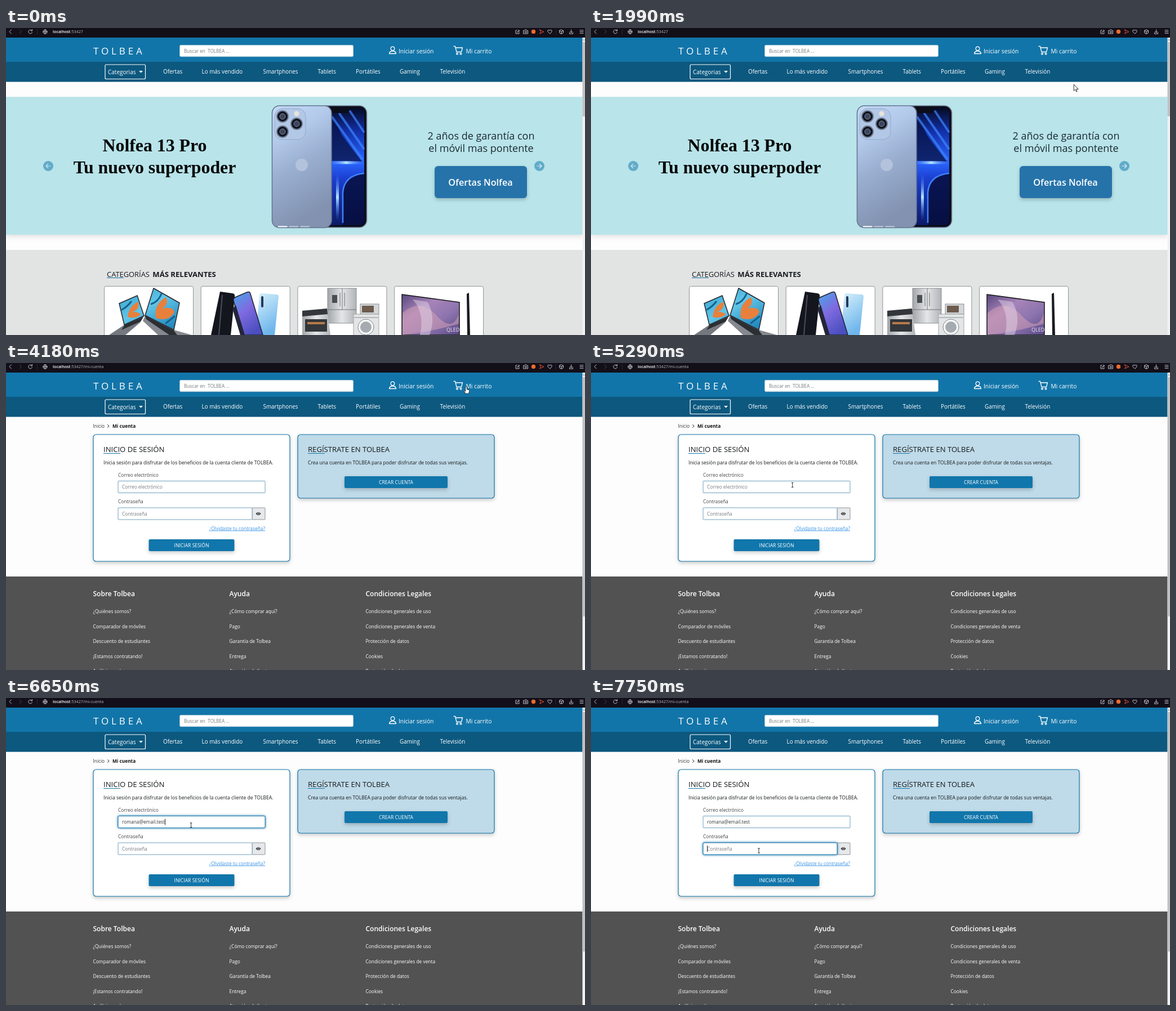
These frames come from a looping animation (1028x545 px, 8 s). An HTML page:

```html
<!DOCTYPE html>
<html lang="es">
<head>
<meta charset="utf-8">
<title>Tienda</title>
<style>
  html, body { margin: 0; width: 100%; height: 100%; overflow: hidden; background: #fdfdfd; }
  svg { display: block; width: 100vw; height: 100vh; }
  text { font-family: "Open Sans", "Noto Sans", sans-serif; white-space: pre; }
  .serif { font-family: "Liberation Serif", "Noto Serif", serif; font-weight: 700; }
  .medium { font-weight: 500; }
  .semi { font-weight: 600; }
  .bold { font-weight: 700; }
  .mid { text-anchor: middle; }
  .end { text-anchor: end; }
  .link { text-decoration: underline; }
  .line { fill: none; stroke-linecap: round; stroke-linejoin: round; }
  .shadow { filter: drop-shadow(0 3px 3px rgba(0, 0, 0, .2)); }
  .soft { filter: drop-shadow(0 4px 4px rgba(0, 0, 0, .1)); }
  .glow { filter: drop-shadow(0 0 2px #1176ab); }
</style>
</head>
<body>
<svg viewBox="0 0 1028 545" preserveAspectRatio="none">
  <defs>
    <linearGradient id="back" x2=".3" y2="1"><stop stop-color="#c3dbf8"/><stop offset=".3" stop-color="#b2c9ea"/><stop offset=".55" stop-color="#9bb0d2"/><stop offset="1" stop-color="#8292b0"/></linearGradient>
    <linearGradient id="screen" x2="0" y2="1"><stop stop-color="#060b26"/><stop offset=".2" stop-color="#1230a8"/><stop offset=".46" stop-color="#2a66ff"/><stop offset=".6" stop-color="#1b3fd0"/><stop offset="1" stop-color="#0c1a66"/></linearGradient>
    <linearGradient id="beam"><stop stop-color="#3c78ff" stop-opacity="0"/><stop offset=".5" stop-color="#b4e6ff"/><stop offset="1" stop-color="#3c78ff" stop-opacity="0"/></linearGradient>
    <linearGradient id="beamV" x2="0" y2="1"><stop stop-color="#3c78ff" stop-opacity="0"/><stop offset=".5" stop-color="#b4e6ff"/><stop offset="1" stop-color="#3c78ff" stop-opacity="0"/></linearGradient>
    <linearGradient id="violet" x2=".6" y2="1"><stop stop-color="#47a9e8"/><stop offset=".5" stop-color="#7f6ae0"/><stop offset="1" stop-color="#4b4fc0"/></linearGradient>
    <linearGradient id="ice" x2=".4" y2="1"><stop stop-color="#d9f2fb"/><stop offset="1" stop-color="#6fb6ec"/></linearGradient>
    <linearGradient id="tv" x2="1" y2="1"><stop stop-color="#59487f"/><stop offset=".35" stop-color="#a684b8"/><stop offset=".65" stop-color="#8d74ae"/><stop offset="1" stop-color="#5a4a86"/></linearGradient>
    <linearGradient id="steel"><stop stop-color="#a2a6a9"/><stop offset=".5" stop-color="#e4e6e7"/><stop offset="1" stop-color="#b0b4b7"/></linearGradient>
    <linearGradient id="wallpaper" x2=".8" y2="1"><stop stop-color="#2f9ccb"/><stop offset=".5" stop-color="#62c6e8"/><stop offset="1" stop-color="#2387bd"/></linearGradient>
  </defs>

  <rect width="1028" height="545" fill="#fdfdfd"/>

  <g id="home">
    <rect class="soft" y="122.300" width="1024" height="244.700" fill="#b8e4ea"/>
    <g id="phone">
      <rect x="556" y="138" width="84.500" height="216" rx="13" fill="#0b0d18" stroke="#77809a" stroke-width="1.600"/>
      <rect x="560" y="142" width="76" height="208" rx="9" fill="url(#screen)"/>
      <path d="M578 150V236L632 237 596 190Z" fill="#071040" opacity=".75"/>
      <path class="line" d="M579 158L632 232M592 152L635 214M611 148L635 184" stroke="#3d86ff" stroke-width="4" opacity=".7"/>
      <path d="M598 350V292Q600 262 636 258V341Q636 350 628 350Z" fill="#060d3c" opacity=".85"/>
      <path class="line" d="M598 345V292Q600 262 635 258" stroke="#3f83ff" stroke-width="2.500"/>
      <rect x="572" y="236.500" width="64" height="5" fill="url(#beam)"/>
      <rect x="586" y="258" width="5" height="84" fill="url(#beamV)"/>
      <path d="M574 141H608V146Q608 151 602 151H574Z" fill="#0b0d18"/>
      <rect x="472.500" y="138" width="105.500" height="216.500" rx="13" fill="url(#back)" stroke="#687690" stroke-width="1.600"/>
      <rect x="477" y="143" width="55" height="55" rx="14" fill="#b3c8e6" stroke="#93a9ca"/>
      <g fill="#0f131c" stroke="#6d7a92" stroke-width="2"><circle cx="491" cy="157" r="10"/><circle cx="516" cy="170" r="10"/><circle cx="491" cy="184" r="10"/></g>
      <g fill="#3a4660" stroke="#7d8798"><circle cx="491" cy="157" r="5"/><circle cx="516" cy="170" r="5"/><circle cx="491" cy="184" r="5"/></g>
      <circle cx="516" cy="152" r="4.500" fill="#e9e3dc"/>
      <circle cx="525" cy="243" r="11" fill="#b4c3dc"/>
    </g>
    <path d="M483 352.500H499.500" stroke="#fff" stroke-width="2"/>
    <path d="M502.500 352.500H519M522.500 352.500H539" stroke="#fff" stroke-width="2" opacity=".5"/>
    <rect class="shadow" x="761" y="245" width="164" height="57" rx="6" fill="#2673aa"/>
    <g class="line" stroke="#fff" stroke-width="1.200">
      <circle cx="75" cy="245" r="9" fill="#1176ab" stroke="none" opacity=".52"/>
      <path d="M79 245H71M74.500 241.500L71 245 74.500 248.500" opacity=".7"/>
      <circle id="next" cx="947" cy="245" r="9" fill="#1176ab" stroke="none"/>
      <path d="M943 245H951M947.500 241.500L951 245 947.500 248.500" opacity=".8"/>
    </g>

    <rect y="394" width="1024" height="151" fill="#e2e4e4"/>
    <path d="M179 443.500H209" stroke="#1176ab"/>
    <g id="cards" fill="#fff" stroke="#8f9394"></g>

    <path d="M210 527L245 511 238 523 212 545H183Z" fill="#75797f"/>
    <path d="M211 527L244 513 239 521 205 536Z" fill="#2b2e33"/>
    <path d="M247 510L298 536 330 545H270L243 520Z" fill="#85898f"/>
    <path d="M247 511L298 537 304 545H290L249 517Z" fill="#2b2e33"/>
    <path d="M201 489L233 475 245 511 210 527ZM262 462L308 488 298 536 247 510Z" fill="url(#wallpaper)" stroke="#24262b" stroke-width="1.500"/>
    <path d="M216 513Q218 493 235 486 238 500 224 504 238 504 239 509 228 517 216 513ZM266 515Q262 490 284 478 290 490 277 498 296 494 299 504 290 522 266 515Z" fill="#e8803c"/>
    <path d="M206 500Q216 494 222 486M258 490Q270 486 276 472M284 524Q294 516 299 512" class="line" stroke="#14628f" stroke-width="3"/>

    <path d="M380 468L402 471Q407 472 406 477L399 545H364Z" fill="#14161d"/>
    <path d="M384 474L378 545" stroke="#4a4f5c" stroke-width="2"/>
    <path d="M450 475Q450 471 454 471L480 473Q484 473 484 477L477 545H443Z" fill="url(#ice)"/>
    <path d="M404 484Q403 480 407 478L428 469Q433 467 434 472L456 545H420Z" fill="url(#violet)" stroke="#20222e" stroke-width="1.500"/>
    <path d="M408 492L424 545H416L402 498Z" fill="#23263a"/>
    <path d="M455 478V494" stroke="#24385a" stroke-width="4" stroke-linecap="round"/>

    <rect x="571" y="462" width="51" height="62" fill="url(#steel)" stroke="#8b8f92"/>
    <path d="M597 462V500M571 500H622M593 470V494M601 470V494" stroke="#6f7376"/>
    <rect x="579" y="474" width="9" height="14" fill="#4a4e52"/>
    <path d="M526 502L570 498 576 545H526Z" fill="url(#steel)"/>
    <path d="M526 502L570 498 571 508 526 512ZM531 517H570V539H531Z" fill="#33363a"/>
    <path d="M535 524H566" stroke="#b77a4a" stroke-width="4"/>
    <rect x="629" y="490" width="33" height="18" fill="#d4d6d8" stroke="#8a8e91"/>
    <rect x="632" y="493" width="21" height="12" fill="#6d5b4e"/>
    <rect x="617" y="508" width="45" height="40" fill="#e3e5e6" stroke="#a2a5a8"/>
    <path d="M618 514H661" stroke="#8a8e91"/>
    <circle cx="639" cy="531" r="12" fill="#a5abb0" stroke="#f8f9f9" stroke-width="4"/>
    <circle cx="639" cy="531" r="14" fill="none" stroke="#80858a"/>

    <path d="M703 473L805 487V545H703Z" fill="url(#tv)" stroke="#17181d" stroke-width="1.500"/>
    <path d="M704 506Q735 478 764 510T804 507V525Q760 538 704 545Z" fill="#d9a3b8" opacity=".5"/>
    <path d="M722 482Q744 505 735 545H752Q764 512 748 486Z" fill="#e6dbea" opacity=".45"/>
    <path d="M818 472L822 470 824 545H819Z" fill="#191b20"/>
  </g>

  <g id="account">
    <g class="shadow" stroke="#1176ab" stroke-width="1.200">
      <rect x="155" y="127" width="349" height="225" rx="5" fill="#fff"/>
      <rect x="518" y="127" width="349" height="113" rx="5" fill="#bfdae8"/>
    </g>
    <path d="M173 160.500H203M536 160.500H566" stroke="#1176ab"/>
    <path class="line" d="M180.500 109.500L183 112 180.500 114.500" stroke="#222"/>
    <g fill="#fff" stroke="#5f97b8" stroke-width=".9">
      <rect x="199" y="209.500" width="261" height="21" rx="1"/>
      <rect x="437" y="257" width="23" height="21" rx="1" fill="#e6e8eb" stroke="#85898e"/>
      <rect x="199" y="257" width="238" height="21" rx="1"/>
    </g>
    <path d="M443.500 267.500Q448 262 452.500 267.500 448 273 443.500 267.500Z" fill="#222"/>
    <circle cx="448" cy="267.500" r="1.700" fill="#222" stroke="#e6e8eb" stroke-width=".9"/>
    <rect id="emailFocus" class="glow" x="199" y="209.500" width="261" height="21" rx="2" fill="#fff" stroke="#1c78ab"/>
    <rect id="passFocus" class="glow" x="199" y="257" width="238" height="21" rx="2" fill="#fff" stroke="#1c78ab"/>
    <g class="shadow" fill="#1176ab">
      <rect x="253.500" y="313" width="152" height="21" rx="2"/>
      <rect x="601" y="201" width="183" height="21" rx="2"/>
    </g>
    <rect y="379" width="1024" height="166" fill="#525252"/>
  </g>

  <g id="chrome">
    <rect width="1028" height="17" fill="#120f19"/>
    <rect y="17" width="1024" height="43" fill="#1275a9"/>
    <rect y="60" width="1024" height="35.600" fill="#0c587f"/>
    <rect x="308.500" y="30.400" width="308" height="20.400" rx="2" fill="#fff" stroke="#c3d3dc" stroke-width=".6"/>
    <rect x="176" y="65" width="71.500" height="25.500" rx="2" fill="none" stroke="#fff" stroke-width="1.200"/>
    <path d="M236 76H243L239.500 79.700Z" fill="#fff"/>
    <rect x="1023.500" y="17" width="4.500" height="528" fill="#f1f1f1"/>
    <rect id="thumb" x="1023.500" y="25" width="4.500" fill="#c1c1c3"/>
    <path d="M1024.500 22L1026 20 1027.500 22Z" fill="#777"/>
    <g class="line" stroke="#fff" stroke-width="1.300">
      <circle cx="686.500" cy="36.500" r="3.300"/>
      <path d="M680.500 45.500Q681 41 686.500 41T692.500 45.500Z"/>
      <path d="M795 32.500H797.500L800 42.500H808.500L810.500 35H798.300"/>
      <circle cx="801" cy="45.700" r="1.400"/><circle cx="807.500" cy="45.700" r="1.400"/>
    </g>
    <g class="line" stroke="#d4d2da" stroke-width=".9">
      <path d="M9.500 3L6 6.500 9.500 10M45.500 4A3.400 3.400 0 1 0 46.500 7.500M46.500 2.500V5H44"/>
      <path d="M24 3L27.500 6.500 24 10" opacity=".3"/>
      <path d="M55.500 2V11" opacity=".15"/>
      <path d="M69.500 3A3.700 3.700 0 1 1 69.400 3ZM66 6.700H73M69.500 3Q66.500 6.700 69.500 10.400 72.500 6.700 69.500 3"/>
      <path d="M907 4H905V10H911V8M907.500 8Q907.500 5 911.500 5M909.500 3L911.500 5 909.500 7"/>
      <path d="M919 4.500H920.500L921.500 3H924L925 4.500H926.500V10H919Z"/><circle cx="922.700" cy="7" r="1.500"/>
      <path d="M947.500 3L955 6.700 947.500 10 949.500 6.700Z" stroke="#f0563c"/>
      <path d="M965.500 10L962 6.500Q961 3.500 963.500 3.300 965 3.300 965.500 5 966 3.300 967.500 3.300 970 3.500 969 6.500Z"/>
      <path d="M976 2V11" opacity=".15"/>
      <path d="M986 3L989.500 4.800V8.600L986 10.400 982.500 8.600V4.800ZM982.500 4.800L986 6.600 989.500 4.800M986 6.600V10.400"/>
      <path d="M1003.500 3V8M1001.500 6.300L1003.500 8.300 1005.500 6.300M1000.500 8V10.300H1006.500V8M1019 4H1025M1019 6.700H1025M1019 9.400H1025"/>
    </g>
    <circle cx="936.500" cy="6.500" r="3.700" fill="#f26a2b"/>
  </g>

  <g id="dropdown"><rect x="199" y="231.500" width="106" height="128" rx="1" fill="#fff" stroke="#7d8185" stroke-width=".9"/></g>
  <path id="caret" stroke="#111" stroke-width=".9"/>
  <path id="cursor" class="line" stroke="#222" stroke-width=".9"/>
</svg>

<script>
const NS = 'http://www.w3.org/2000/svg';
const $ = id => document.getElementById(id);

function add(parent, tag, attrs, content = '') {
  const node = document.createElementNS(NS, tag);
  for (const key in attrs) node.setAttribute(key, attrs[key]);
  node.textContent = content;
  return $(parent).appendChild(node);
}
const label = (parent, x, y, size, fill, content, cls = '') =>
  add(parent, 'text', { x, y, 'font-size': size, fill, class: cls }, content);

// Browser bar and shop header
label('chrome', 83, 9.2, 7.2, '#fff', 'localhost', 'semi').setAttribute('id', 'host');
$('host').insertAdjacentHTML('beforeend', '<tspan fill="#b9b7c0" font-weight="400">:53427<tspan id="path"></tspan></tspan>');
label('chrome', 155, 46.5, 17, '#fff', 'TOLBEA').setAttribute('letter-spacing', 4.9);
label('chrome', 316, 44, 8.2, '#75797d', 'Buscar en  TOLBEA ...');
label('chrome', 697, 45, 10.25, '#fff', 'Iniciar sesión');
label('chrome', 816.5, 45, 10.25, '#fff', 'Mi carrito');
label('chrome', 181, 82, 10, '#fff', 'Categorias');
[[279, 'Ofertas'], [347.5, 'Lo más vendido'], [456.5, 'Smartphones'], [553.5, 'Tablets'],
 [621, 'Portátiles'], [699, 'Gaming'], [770.5, 'Televisión']]
  .forEach(([x, name]) => label('chrome', x, 81, 9.9, '#fff', name));

// Home page
label('home', 264, 219, 31.8, '#050505', 'Nolfea 13 Pro', 'serif mid');
label('home', 264, 257.5, 31.8, '#050505', 'Tu nuevo superpoder', 'serif mid');
label('home', 843.5, 197.7, 18, '#1c2a30', '2 años de garantía con', 'medium mid');
label('home', 843.5, 220, 18, '#1c2a30', 'el móvil mas pontente', 'medium mid');
label('home', 842.5, 279.5, 16.2, '#fff', 'Ofertas Nolfea', 'semi mid');
label('home', 179, 442, 12.9, '#161a1d', 'CATEGORÍAS');
label('home', 260.3, 442, 13.1, '#161a1d', 'MÁS RELEVANTES', 'bold');
label('home', 782, 539, 9, '#f3e9f5', 'QLED');
for (let i = 0; i < 4; i++)
  add('cards', 'rect', { x: 174.5 + i * 171.7, y: 458.5, width: 158, height: 100, rx: 3 });

// Account page
label('account', 154.5, 114.5, 8.3, '#333', 'Inicio');
label('account', 189, 114.5, 8.3, '#111', 'Mi cuenta', 'bold');
label('account', 173, 158, 13.1, '#161a1d', 'INICIO DE SESIÓN');
label('account', 536, 158, 13.1, '#161a1d', 'REGÍSTRATE EN TOLBEA');
label('account', 173, 180, 8.55, '#161a1d', 'Inicia sesión para disfrutar de los beneficios de la cuenta cliente de TOLBEA.');
label('account', 536, 180, 8.55, '#161a1d', 'Crea una cuenta en TOLBEA para poder disfrutar de todas sus ventajas.');
label('account', 199, 202, 8.35, '#444', 'Correo electrónico');
label('account', 199, 249, 8.35, '#444', 'Contraseña');
const email = label('account', 206, 223, 8.35, '', '');
label('account', 206, 271, 8.35, '#75797d', 'Contraseña');
label('account', 460, 296.5, 8.35, '#3a93e6', '¿Olvidaste tu contraseña?', 'link end');
label('account', 329.5, 326.5, 8.6, '#fff', 'INICIAR SESIÓN', 'mid');
label('account', 692.5, 214.5, 8.6, '#fff', 'CREAR CUENTA', 'mid');

[['Sobre Tolbea', '¿Quiénes somos?', 'Comparador de móviles', 'Descuento de estudiantes', '¡Estamos contratando!', 'Análisis y más'],
 ['Ayuda', '¿Cómo comprar aquí?', 'Pago', 'Garantía de Tolbea', 'Entrega', 'Atención al cliente'],
 ['Condiciones Legales', 'Condiciones generales de uso', 'Condiciones generales de venta', 'Protección de datos', 'Cookies', 'Protección de datos']]
  .forEach(([title, ...links], col) => {
    const x = 154.5 + col * 242;
    label('account', x, 414, 12, '#fff', title, 'semi');
    links.forEach((name, row) => label('account', x, 444.3 + row * 26.4, 8.4, '#fff', name));
  });

['pepitulina@email.test', 'lola@email.test', 'est0370485913@sede.test', 'marcos@email.test', 'test', 'fermin_@email.test']
  .forEach((name, i) => label('dropdown', 206, 248.5 + i * 19.85, 6.5, '#222', name));

// Animation: pointer stops as [time, x, y]
const pointerPath = [
  [770, 1004, 532], [1050, 962, 370], [1330, 926, 234.5], [1600, 905, 170], [2320, 817, 42],
  [4580, 817, 42], [4850, 640, 110], [5150, 400, 205], [5360, 337, 222], [5570, 333, 218],
  [6580, 333, 218], [7000, 307, 264], [7140, 306, 266], [7340, 306, 266], [7480, 298, 271]
];
const shapes = {
  hand: 'M-1.3 1Q0-1 1.3 1V4.8L4.6 5.6Q6 6 5.6 8.5L4.5 12.3H-.8L-3.5 8.5Q-3.5 6.5-1.3 8Z',
  arrow: 'M0 0V11L2.6 8.6 4.4 12.6 6 12 4.3 8H7.6Z',
  beam: 'M-1.5-4H1.5M0-4V4M-1.5 4H1.5'
};
const clamp = v => Math.min(1, Math.max(0, v));
const show = (id, visible) => $(id).setAttribute('visibility', visible ? 'inherit' : 'hidden');

function pointerAt(t) {
  const i = pointerPath.findIndex(p => p[0] > t);
  if (i < 0) return pointerPath.at(-1).slice(1);
  const [t0, x0, y0] = pointerPath[Math.max(0, i - 1)], [t1, x1, y1] = pointerPath[i];
  const k = i ? (t - t0) / (t1 - t0) : 0;
  return [x0 + (x1 - x0) * k, y0 + (y1 - y0) * k];
}

function shapeAt(x, y, onAccount) {
  if (x > 793 && y > 30 && y < 54) return 'hand';
  if (!onAccount) return x > 870 && y > 122 && y < 367 ? 'hand' : 'arrow';
  const inField = x > 199 && x < 460 && (Math.abs(y - 220) < 11 || Math.abs(y - 267) < 11);
  return inField ? 'beam' : 'arrow';
}

function draw(t) {
  const emailClick = 5500, listOpen = 5570, fillTime = 6650, passClick = 7480;
  const onAccount = t >= 4180, filled = t >= fillTime, inPass = t >= passClick;
  show('home', !onAccount);
  show('account', onAccount);
  show('dropdown', t >= listOpen && !filled);
  $('path').textContent = onAccount ? '/mi-cuenta' : '';
  $('thumb').setAttribute('height', onAccount ? 425 : 132);

  const [x, y] = pointerAt(t), shape = shapeAt(x, y, onAccount);
  const cursor = $('cursor');
  show('cursor', t >= 770);
  cursor.setAttribute('d', shapes[shape]);
  cursor.setAttribute('transform', `translate(${x} ${y})`);
  cursor.style.fill = shape === 'beam' ? 'none' : '#fff';
  $('next').setAttribute('opacity', !onAccount && t >= 770 && shape === 'hand' && y > 122 ? .95 : .52);

  const passLevel = clamp((t - passClick) / 150);
  $('emailFocus').setAttribute('opacity', clamp((t - emailClick) / 150) * (1 - passLevel));
  $('passFocus').setAttribute('opacity', passLevel);
  email.textContent = filled ? 'romana@email.test' : 'Correo electrónico';
  email.setAttribute('fill', filled ? '#333' : '#75797d');

  const since = inPass ? passClick : filled ? fillTime : listOpen;
  show('caret', t >= listOpen && (t - since) % 1060 < 530);
  const caretX = filled && !inPass ? 206.5 + email.getComputedTextLength() : 206.5;
  $('caret').setAttribute('d', `M${caretX} ${inPass ? 262 : 214.5}v11`);
}

const start = performance.now();
function tick() {
  draw((performance.now() - start) % 8000);
  requestAnimationFrame(tick);
}
tick();
</script>
</body>
</html>
```
